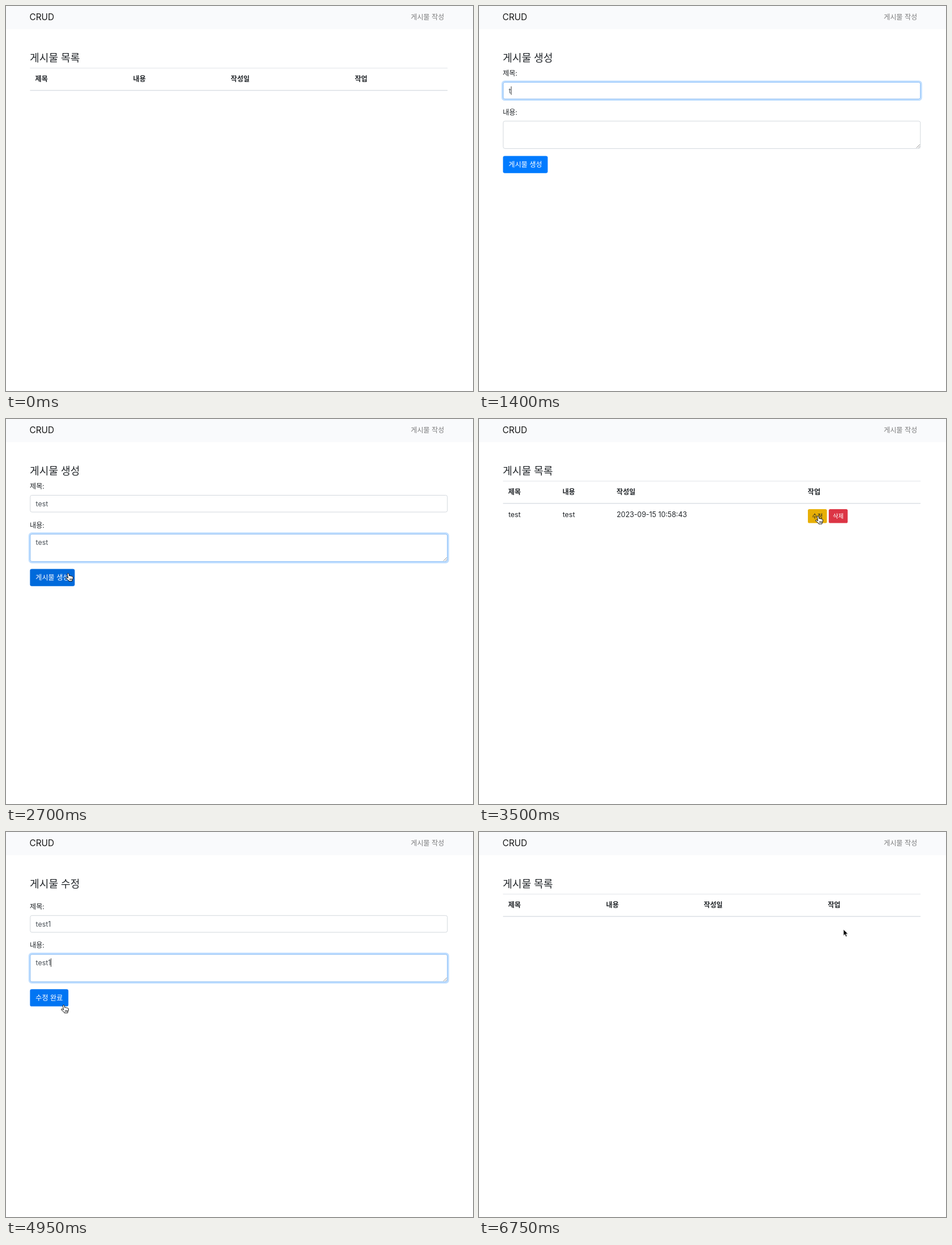
These frames come from a looping animation (825x679 px, 7.22 s). An HTML page:

```html
<!DOCTYPE html>
<html lang="ko">
<head>
<meta charset="utf-8">
<title>CRUD</title>
<style>
  html, body { margin: 0; width: 100%; height: 100%; overflow: hidden; background: #fff; }
  svg { display: block; width: 825px; height: 679px; }
  text { font: 12.15px Inter, "Noto Sans CJK KR", "Noto Sans CJK", sans-serif; fill: #212529; }
  .brand { font-size: 15.4px; letter-spacing: -.1px; fill: #191919; }
  #link { fill: #000; fill-opacity: .5; }
  #heading { font-size: 18.2px; font-weight: 500; }
  #head text { font-weight: 700; }
  #row text { font-size: 12.4px; }
  .btn text, #row .btn text { text-anchor: middle; fill: #fff; }
  #row .btn text { font-size: 10.5px; }
  #row .btn text.dark { fill: #212529; }
  .shade { fill: #000; opacity: 0; }
  .value { font-size: 12.4px; letter-spacing: -.05px; fill: #495057; }
  .box { fill: #fff; stroke: #ced4da; stroke-width: .9; }
  .ring rect { fill: none; }
  .glow { stroke: #bfdeff; stroke-width: 2.6; }
  .edge { stroke: #80bdff; stroke-width: .9; }
  .grip { stroke: #777; stroke-width: .8; }
  #arrow { fill: #000; stroke: #fff; stroke-width: .7; filter: drop-shadow(0 .6px .6px #0006); }
  #hand { fill: #fff; stroke: #000; stroke-width: .9; stroke-linejoin: round; filter: drop-shadow(0 .6px .6px #0004); }
  #beam { fill: none; stroke: #222; stroke-width: .9; }
</style>
</head>
<body>
<svg viewBox="0 0 825 679">
  <rect width="825" height="41" fill="#f9fafc"/>
  <text class="brand" x="41.6" y="25.2">CRUD</text>
  <text id="link" x="715" y="23.6">게시물 작성</text>
  <text id="heading" x="42" y="97.8"></text>

  <g id="list">
    <rect x="42.4" y="109" width="737.6" height=".9" fill="#dee2e6"/>
    <rect x="42.4" y="148" width="737.6" height="1.6" fill="#dee2e6"/>
    <g id="head">
      <text y="133.4">제목</text><text y="133.4">내용</text><text y="133.4">작성일</text><text y="133.4">작업</text>
    </g>
    <g id="row">
      <text class="cell" y="173.2"></text><text class="cell" y="173.2"></text>
      <text class="cell" y="173.2">2023-09-15 10:58:43</text>
      <g id="actions">
        <g class="btn">
          <rect y="159" width="33.6" height="24.6" rx="2.6" fill="#ffc107"/>
          <rect class="shade" id="editShade" y="159" width="33.6" height="24.6" rx="2.6"/>
          <text class="dark" x="16.8" y="174.9">수정</text>
        </g>
        <g class="btn" transform="translate(36.9)">
          <rect y="159" width="33.4" height="24.6" rx="2.6" fill="#dc3545"/>
          <rect class="shade" id="deleteShade" y="159" width="33.4" height="24.6" rx="2.6"/>
          <text x="16.7" y="174.9">삭제</text>
        </g>
      </g>
    </g>
  </g>

  <g id="form">
    <text x="42" y="123.4">제목:</text>
    <rect class="box" x="42.8" y="134.5" width="736.9" height="29.6" rx="3"/>
    <g class="ring" id="titleRing">
      <rect class="glow" x="41.1" y="132.8" width="740.3" height="33" rx="4.4"/>
      <rect class="edge" x="42.8" y="134.5" width="736.9" height="29.6" rx="3"/>
    </g>
    <text class="value" id="title" x="52.6" y="154"></text>
    <text x="42" y="191.6">내용:</text>
    <rect class="box" x="42.8" y="203" width="736.9" height="48.4" rx="3"/>
    <g class="ring" id="bodyRing">
      <rect class="glow" x="41.1" y="201.3" width="740.3" height="51.8" rx="4.4"/>
      <rect class="edge" x="42.8" y="203" width="736.9" height="48.4" rx="3"/>
    </g>
    <path class="grip" d="M772.8 250.2l6-6M776.2 250.2l2.6-2.6"/>
    <text class="value" id="body" x="52.6" y="222.3"></text>
    <rect id="caret" width=".9" height="15" fill="#222"/>
    <g class="btn">
      <rect class="save" x="42.4" y="264.4" height="30.4" rx="3.2" fill="#007bff"/>
      <rect class="save shade" id="saveShade" x="42.4" y="264.4" height="30.4" rx="3.2"/>
      <text id="saveText" y="284.3"></text>
    </g>
  </g>

  <g id="cursor">
    <path id="arrow" d="M0 0V10.6L2.4 8.4 4.2 12.5 6 11.7 4.3 7.7H7.7Z"/>
    <path id="hand" d="M-1.2 1.4C-1.2-.1 1-.2 1.4 1.1L2.5 5C3.2 4.1 4.6 4.3 4.9 5.2 5.6 4.6 6.9 4.9 7.1 5.9 7.9 5.4 8.9 6 8.9 7L8.7 10 7.5 12.4V14H1.5L1.2 12.7-3.5 8.8C-4.3 7.6-3 6.6-2 7.2L.2 8.6Z M3.2 9.4v2.6M5 9.4v2.6M6.7 9.4v2.6"/>
    <path id="beam" d="M-2-6Q0-6 0-5Q0-6 2-6M0-5V5M-2 6Q0 6 0 5Q0 6 2 6M-1.2 2H1.2"/>
  </g>
</svg>
<script>
const LOOP = 7220, TICK = 50;
const $ = id => document.getElementById(id);

// Each track holds [start time, value]
const pages = [[0, 'empty'], [750, 'create'], [2850, 'first'], [3650, 'edit'], [5250, 'second'], [6450, 'empty']];
const titles = [[0, ''], [1400, 't'], [1450, 'te'], [1550, 'tes'], [1700, 'test'], [4300, 'test1']];
const bodies = [[0, ''], [2050, 't'], [2100, 'te'], [2200, 'tes'], [2300, 'test'], [4600, 'test1']];
const focuses = [[0, ''], [1200, 'title'], [1900, 'body'], [2850, ''], [4150, 'title'], [4450, 'body'], [5250, '']];
const shapes = [[0, ''], [200, 'arrow'], [400, 'hand'], [850, 'arrow'], [1100, 'beam'], [1350, ''],
  [2350, 'beam'], [2500, 'hand'], [2850, 'arrow'], [3400, 'hand'], [3700, 'arrow'], [4000, 'beam'], [4250, ''],
  [4650, 'beam'], [4750, 'arrow'], [4900, 'hand'], [5250, 'arrow'], [6050, 'hand'], [6700, 'arrow']];

// Pointer path: time, x, y
const path = [[200, 787, 46], [400, 748, 22], [500, 745, 19], [750, 745, 19], [900, 690, 75], [1200, 330, 150],
  [2300, 330, 150], [2600, 109.5, 272], [2750, 109.5, 272], [3250, 592, 192], [3350, 592, 192],
  [3450, 598.5, 171], [3600, 598.5, 171], [4100, 330, 163], [4650, 330, 163], [4850, 120, 303],
  [4900, 101.5, 305], [5150, 101.5, 305], [5600, 556, 217], [5700, 608, 212], [5800, 640.3, 202],
  [5950, 658, 187], [6100, 646, 174], [6200, 644, 172]];

const columns = {
  empty: [51.6, 224.6, 397, 616.2],
  first: [51.6, 147.4, 243, 580.8],
  second: [51.6, 156.6, 261.7, 588]
};
const headings = { create: '게시물 생성', edit: '게시물 수정' };

const entry = (track, t) => track.findLast(e => e[0] <= t);
const at = (track, t) => entry(track, t)[1];
const ramp = (t, from) => Math.min(1, Math.max(0, (t - from) / 150));
const show = (el, on) => el.style.visibility = on ? 'inherit' : 'hidden';

function position(t) {
  const next = path.findIndex(p => p[0] > t);
  if (next < 0) return path.at(-1).slice(1);
  if (!next) return path[0].slice(1);
  const [a, b] = [path[next - 1], path[next]];
  const u = (t - a[0]) / (b[0] - a[0]), e = u * u * (3 - 2 * u);
  return [1, 2].map(i => a[i] + (b[i] - a[i]) * e);
}

function hover(id, t, ...spans) {
  const span = spans.find(([from, to]) => t >= from && t < to);
  $(id).style.opacity = span ? .14 * ramp(t, span[0]) : 0;
}

function drawList(page) {
  const xs = columns[page], filled = page !== 'empty';
  [...$('head').children].forEach((el, i) => el.setAttribute('x', xs[i]));
  show($('row'), filled);
  document.querySelectorAll('.cell').forEach((el, i) => {
    el.setAttribute('x', xs[i] + .3);
    if (i < 2) el.textContent = page === 'first' ? 'test' : 'test1';
  });
  $('actions').setAttribute('transform', `translate(${xs[3] + .2})`);
}

function drawForm(page, t) {
  const edit = page === 'edit', width = edit ? 67.8 : 79;
  $('form').setAttribute('transform', `translate(0 ${edit ? 12.8 : 0})`);
  document.querySelectorAll('.save').forEach(el => el.setAttribute('width', width));
  $('saveText').textContent = edit ? '수정 완료' : headings.create;
  $('saveText').setAttribute('x', 42.4 + width / 2);
  $('title').textContent = at(titles, t);
  $('body').textContent = at(bodies, t);

  const [since, field] = entry(focuses, t);
  for (const id of ['title', 'body'])
    $(id + 'Ring').style.opacity = id === field ? ramp(t, since - 50) : 0;
  const caretOn = field && !(t >= 2650 && t < 2850);
  show($('caret'), caretOn);
  if (caretOn) {
    $('caret').setAttribute('x', 52.5 + $(field).getComputedTextLength());
    $('caret').setAttribute('y', field === 'title' ? 141.7 : 210);
  }
}

function render(t) {
  const page = at(pages, t), isList = page in columns;
  $('heading').textContent = headings[page] || '게시물 목록';
  show($('list'), isList);
  show($('form'), !isList);
  if (isList) drawList(page); else drawForm(page, t);

  $('link').style.fillOpacity = t >= 400 && t < 850 ? .7 : .5;
  hover('saveShade', t, [2500, 2850], [4900, 5250]);
  hover('editShade', t, [3400, 3650]);
  hover('deleteShade', t, [6050, 6450]);

  const shape = at(shapes, t);
  for (const id of ['arrow', 'hand', 'beam']) show($(id), id === shape);
  $('cursor').setAttribute('transform', `translate(${position(t)})`);
}

const start = performance.now();
let last = -1;
function loop() {
  const t = Math.floor((performance.now() - start) % LOOP / TICK) * TICK;
  if (t !== last) render(last = t);
  requestAnimationFrame(loop);
}
loop();
</script>
</body>
</html>
```
